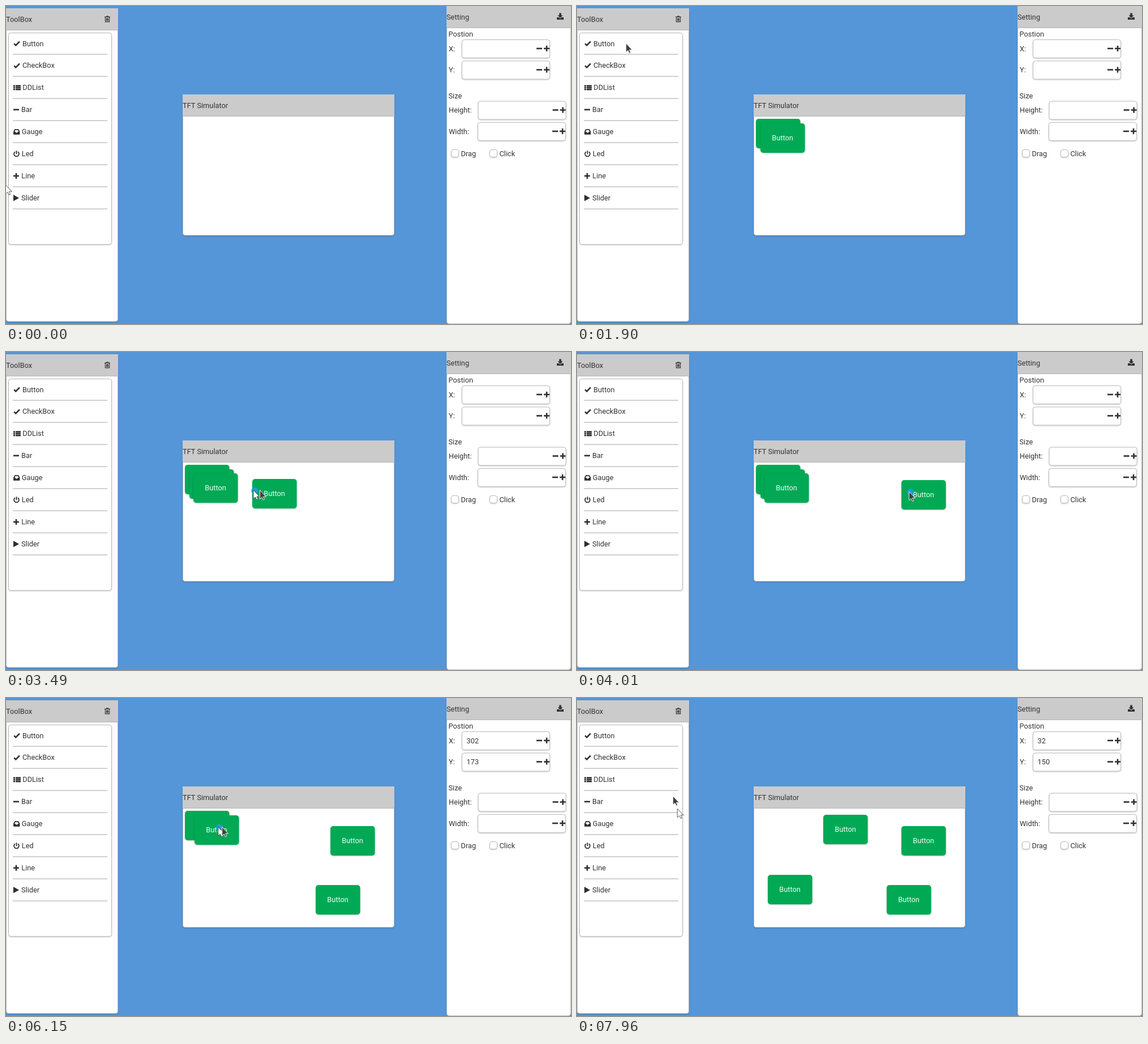
Animation, 998 px wide and 561 px high, one loop 8000 ms. Source, as an HTML page:

```html
<!DOCTYPE html>
<html lang="en">
<head>
<meta charset="utf-8">
<title>TFT Simulator</title>
<style>
  html, body { margin: 0; width: 100%; height: 100%; overflow: hidden; background: #5596d8; }
  svg { display: block; width: 998px; height: 561px; }
  text { font: 12.8px Roboto, "Open Sans", sans-serif; fill: #333; white-space: pre; }
  .card { fill: #fff; stroke: #bababa; filter: drop-shadow(0 1.5px 1px rgba(0, 0, 0, .2)); }
  .head { fill: #cbcbcb; }
  .edge { stroke: #b5b5b5; }
  .rule { stroke: #c2c2c2; stroke-width: 1.5; }
  .icon { fill: none; stroke: #2e2e2e; stroke-width: 2.6; }
  .icon .solid { fill: #2e2e2e; stroke: none; }
  .icon .fine { stroke-width: 1.1; }
  .icon .medium { stroke-width: 1.8; }
  .green { fill: #01a955; filter: drop-shadow(0 1.5px 1px rgba(0, 0, 0, .22)); }
  .cap { fill: #f2fbf6; text-anchor: middle; }
</style>
</head>
<body>
<svg id="stage" viewBox="0 0 998 561"></svg>
<script>
const LOOP = 8000;
const LAG = 30;           // the white pointer trails the dark one
const SCALE = 374 / 480;  // stage pixels per simulated display pixel
const stage = document.getElementById('stage');

const rect = (x, y, w, h, cls, r = 0) =>
  `<rect x="${x}" y="${y}" width="${w}" height="${h}" rx="${r}" class="${cls}"/>`;
const label = (x, y, s, attrs = '') => `<text x="${x}" y="${y + 4.5}" ${attrs}>${s}</text>`;
const line = (d, cls = '') => `<path d="${d}" class="${cls}"/>`;
const solid = d => line(d, 'solid');
const icon = (x, y, name) => `<g class="icon" transform="translate(${x} ${y})">${icons[name]}</g>`;

// Icons are centred vertically on y = 0.
const icons = {
  check: line('M1.2 .4L4.3 3.4 11-3.3'),
  list: [-4.5, -1.3, 1.9].map(y => solid(`M0 ${y}h3v2.6h-3zM4 ${y}h9v2.6h-9z`)).join(''),
  minus: line('M0 0H10'),
  inbox: line('M1 0L3-3.7H8.5L10.5 0V4H1Z', 'medium') + solid('M1 0H3.6L4.6 1.8H7L8 0H10.5V4.5H1Z'),
  power: line('M3-3.4A4.4 4.4 0 1 0 8-3.4M5.5-5.5V.5', 'medium'),
  plus: line('M0 0H10M5-5V5'),
  play: solid('M0-5.7L10 0 0 5.7Z'),
  trash: line('M0-3.6H10M3.2-3.8L4-5.2H6L6.8-3.8M1.4-3.4V4.9H8.6V-3.4M3.6-1.6V3.2M5-1.6V3.2M6.4-1.6V3.2', 'fine'),
  download: solid('M4.2-6h3.6v4H10.5L6 2.4 1.5-2H4.2ZM0 1.5H3.5L6 3.8 8.5 1.5H12V5.5H0Z')
};

const tools = [
  ['Button', 'check', 29], ['CheckBox', 'check', 29], ['DDList', 'list', 29.3], ['Bar', 'minus', 27],
  ['Gauge', 'inbox', 27.8], ['Led', 'power', 27.8], ['Line', 'plus', 27.3], ['Slider', 'play', 27]
];

function panel(x, y, w, h, title) {
  return rect(x + .5, y + .5, w - 1, h - 1, 'card', 4) + rect(x, y, w, 38, 'head') +
    line(`M${x} ${y + 38.5}h${w}`, 'edge') + label(x, y + 19, title);
}

function toolBox() {
  const rows = tools.map(([name, kind, x], i) => {
    const y = 66 + i * 38.95;
    return icon(13, y, kind) + label(x, y, name) + line(`M12 ${y + 19.3}H179`, 'rule');
  });
  return panel(0, 4, 198, 553, 'ToolBox') + icon(174, 23, 'trash') + rect(4.5, 47.5, 182, 373, 'card', 4) +
    '<rect id="row" x="5" y="48" width="181" height="37" rx="3" fill="#c8c8c8"/>' + rows.join('');
}

const field = (x, y, name) =>
  label(782, y, name) + rect(x + .5, y - 15.5, 155, 32, 'card', 4) +
  icon(x + 132, y, 'minus') + icon(x + 145, y, 'plus');
const tickBox = (x, name) => rect(x + .5, 253.5, 13, 13, 'card', 3.5) + label(x + 17.5, 260, name);

function settings() {
  return panel(778, 0, 220, 561, 'Setting') + icon(973, 18.5, 'download') +
    label(781.5, 49.5, 'Postion') + field(805, 75, 'X:') + field(805, 112.5, 'Y:') +
    label(781.5, 158, 'Size') + field(833.6, 183.5, 'Height:') + field(833, 221, 'Width:') +
    tickBox(786, 'Drag') + tickBox(854, 'Click') +
    label(813.5, 75, '', 'id="valX"') + label(813.5, 112.5, '', 'id="valY"');
}

const button = i =>
  `<g id="b${i}">${rect(0, 0, 78.6, 52, 'green', 5)}${label(39, 25, 'Button', 'class="cap"')}</g>`;
const arrow = 'M0 0V15.5L3.5 12.3 5.9 17.3 8.2 16.2 6 11.4H10.8Z';
const order = [0, 1, 2, 3];

stage.innerHTML = toolBox() + panel(312, 156, 374, 249, 'TFT Simulator') + settings() +
  order.map(button).join('') +
  '<circle id="dot" r="6" fill="#1c9fd2"/>' +
  `<path id="white" d="${arrow}" fill="#fff" stroke="#333" stroke-width=".8"/>` +
  `<path id="dark" d="${arrow}" fill="#414141" stroke="#fff" stroke-width=".9"/>`;

const $ = id => document.getElementById(id);
const row = $('row'), valX = $('valX'), valY = $('valY');
const dot = $('dot'), white = $('white'), dark = $('dark');
const buttons = order.map(i => $('b' + i));

const clamp01 = v => Math.min(1, Math.max(0, v));
const linear = k => k;
const smooth = k => k * k * (3 - 2 * k);
const mix = (a, b, k) => a.map((v, i) => v + (b[i] - v) * k);
const add = (a, b) => a.map((v, i) => v + b[i]);
const progress = (t, [from, to]) => clamp01((t - from) / (to - from));

// Display coordinates to stage coordinates
const toStage = ([x, y]) => [312 + x * SCALE, 195 + y * SCALE];
const home = i => toStage([5 + 10 * i, 5 + 10 * i]);

// Each new button is one step further down; the top one is dragged away first.
const drags = [
  { i: 3, reach: [2330, 2777], move: [3100, 3990], grab: [13, 20], drop: [335, 40] },
  { i: 2, reach: [4290, 4560], move: [4600, 5240], grab: [32, 5], drop: [302, 173] },
  { i: 1, reach: [5450, 5950], move: [6090, 6430], grab: [48, 21], drop: [158, 14] },
  { i: 0, reach: [6480, 6900], move: [7180, 7600], grab: [29, 30], drop: [32, 150] }
];
const pressSpan = ({ move: [from, to] }) => [from - 50, to + 70];
const clicks = order.map(i => {
  const start = i ? 1550 + 210 * i : 1280;
  return [start, start + 90];
});
const presses = clicks.concat(drags.map(pressSpan));

// Pointer legs: time span, end point, easing
const legs = [
  [[590, 1010], [86, 66], linear],
  ...drags.flatMap(d => [
    [d.reach, add(home(d.i), d.grab), linear],
    [d.move, add(toStage(d.drop), d.grab), smooth]
  ]),
  [[7690, 7930], [177, 196], linear],
  [[7930, 7960], [169, 173], linear]
];
const pointer = t =>
  legs.reduce((at, [span, end, ease]) => mix(at, end, ease(progress(t, span))), [-1, 316]);

const place = (el, [x, y]) => el.setAttribute('transform', `translate(${x.toFixed(2)} ${y.toFixed(2)})`);
const show = (el, on) => el.setAttribute('visibility', on ? 'visible' : 'hidden');

function render(t) {
  for (const { i, move, drop } of drags) {
    const at = mix(home(i), toStage(drop), smooth(progress(t, move)));
    place(buttons[i], at.map(Math.round));
    show(buttons[i], t >= clicks[i][1]);
  }

  const glow = clicks.map(([from, to]) => progress(t, [from, from + 50]) - progress(t, [to, to + 45]));
  row.setAttribute('opacity', Math.max(...glow));

  const dropped = drags.filter(d => t >= pressSpan(d)[1] + 30).pop();
  [valX.textContent, valY.textContent] = dropped ? dropped.drop : ['', ''];

  const trail = pointer(t - LAG);
  place(white, add(trail, [.5, 0]));
  place(dot, add(trail, [3, 1]));
  place(dark, add(pointer(t), [.5, 0]));
  show(dark, t >= 600);
  show(dot, presses.some(([from, to]) => t >= from && t < to));
}

function play(now) {
  render(now % LOOP);
  requestAnimationFrame(play);
}
render(0);
requestAnimationFrame(play);
</script>
</body>
</html>
```
